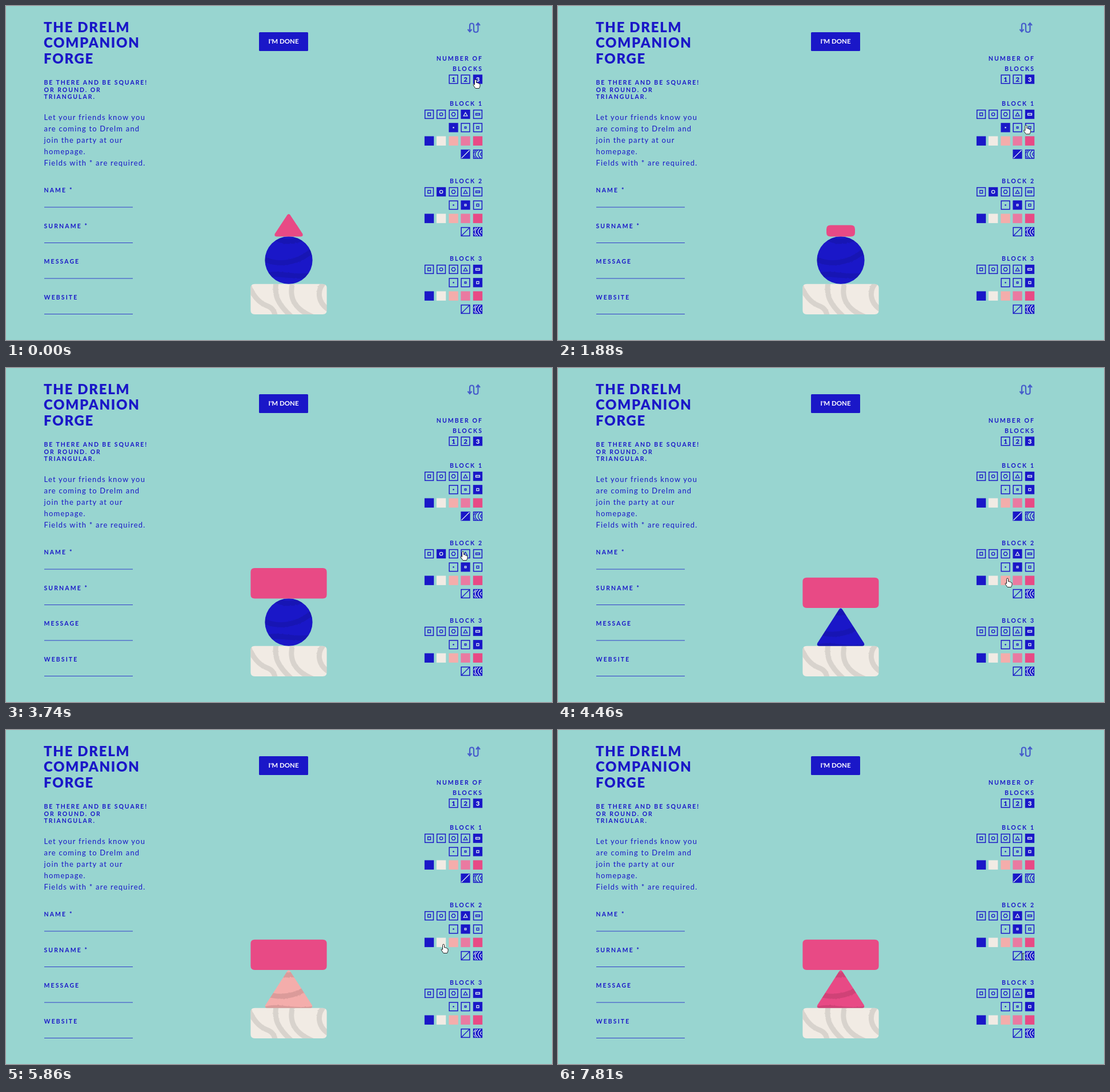
Write an HTML page that moves like this. It is 956x586 px and loops after 8 s.

```html
<!DOCTYPE html>
<html lang="en">
<head>
<meta charset="utf-8">
<title>Character builder</title>
<style>
  html, body { margin: 0; width: 100%; height: 100%; overflow: hidden; background: #98d5d0; }
  svg { display: block; width: 100vw; height: 100vh; }
  text { font-family: Lato, "Open Sans", sans-serif; fill: #1a17c8; white-space: pre; }
  .title { font-size: 24px; font-weight: 900; letter-spacing: 1.7px; }
  .lead { font-size: 10.5px; font-weight: 700; letter-spacing: 1.95px; }
  .body { font-size: 13px; letter-spacing: 1.2px; }
  .label { font-size: 10.5px; font-weight: 700; letter-spacing: 2.1px; }
  .right { text-anchor: end; }
  .button { font-size: 11.5px; font-weight: 700; text-anchor: middle; fill: #fff; }
  .digit { font-size: 11.5px; font-weight: 900; text-anchor: middle; }
</style>
</head>
<body>
<svg viewBox="0 0 956 586" preserveAspectRatio="none">
  <defs>
    <filter id="rough">
      <feTurbulence type="fractalNoise" baseFrequency=".25" numOctaves="2" seed="4"/>
      <feDisplacementMap in="SourceGraphic" scale="2.5"/>
    </filter>
  </defs>
  <g id="page"></g>
  <g id="options"></g>
  <g id="figure"></g>
  <path id="hand" fill="#fff" stroke="#222" stroke-linejoin="round"
    d="M-1.5 1.5Q-1.5 0 0 0T1.5 1.5V5.5Q3.5 5 4 6.3Q6 6 6.3 7.3Q8 7 8 9V11.5L6.5 15.5H0L-3.8 10Q-4.2 8.5 -2.6 8.4L-1.5 9.4Z"/>
  <path id="caret" fill="none" stroke="#333" d="M811.5 391.5Q814 391.5 814 393.5V402Q814 404 811.5 404M816.5 391.5Q814 391.5 814 393.5M814 402Q814 404 816.5 404"/>
</svg>
<script>
const LOOP = 8000;
const BLUE = '#1a17c8', LIGHT = '#d9ecee';
const COLORS = [BLUE, '#f1ebe4', '#f4adab', '#ea7aa1', '#e84a85'];
const [CIRCLE, TRIANGLE, RECT] = [1, 3, 4];
const WIDTHS = [50, 83.3, 133.3];
const RATIO = { [CIRCLE]: 1, [TRIANGLE]: .8, [RECT]: .4 };
const COLUMNS = [741, 762, 783.5, 804.5, 826];
const byId = id => document.getElementById(id);

const text = (cls, x, y, str) => `<text class="${cls}" x="${x}" y="${y}">${str}</text>`;
const lines = (cls, x, y, step, list) =>
  list.map((str, i) => text(cls, x, y + i * step, str)).join('');

function drawPage() {
  const fields = ['NAME *', 'SURNAME *', 'MESSAGE', 'WEBSITE'];
  const rules = fields.map((_, i) =>
    `<rect x="67" y="${352.5 + i * 62.5}" width="155" height="1" fill="${BLUE}" opacity=".8"/>`).join('');
  return lines('title', 66, 45.5, 27.5, ['THE DRELM', 'COMPANION', 'FORGE'])
    + lines('lead', 66.5, 138, 12.6, ['BE THERE AND BE SQUARE!', 'OR ROUND. OR', 'TRIANGULAR.'])
    + lines('body', 66.5, 199.5, 20, ['Let your friends know you', 'are coming to Drelm and',
      'join the party at our', 'homepage.', 'Fields with * are required.'])
    + lines('label', 66.5, 327, 62.5, fields) + rules
    + `<rect x="443" y="46" width="86" height="33" rx="1.5" fill="${BLUE}"/>`
    + text('button', 486, 66.3, 'I\'M DONE')
    + lines('label right', 835.1, 96, 17.5, ['NUMBER OF', 'BLOCKS'])
    + lines('label right', 835.1, 175, 136, ['BLOCK 1', 'BLOCK 2', 'BLOCK 3'])
    + `<path d="M812 44V34Q812 30.5 815.5 30.5T819 34V42.5Q819 46 822.7 46T826.5 42.5V31M808.5 41L812 45L815.5 41M823 34L826.5 30L830 34"
        fill="none" stroke="#465ccb" stroke-width="2.2"/>`;
}

// Each glyph is drawn around (0, 0) in the given ink colour.
const outline = d => ink => `<path d="${d}" fill="none" stroke="${ink}" stroke-width="1.3"/>`;
const box = (w, h = w) => outline(`M${-w / 2} ${-h / 2}h${w}v${h}h${-w}Z`);
const SHAPES = [
  box(5),
  outline('M-2.7 0A2.7 2.7 0 1 1 2.7 0A2.7 2.7 0 1 1 -2.7 0Z'),
  outline('M-3.4 0L-1.7 -3H1.7L3.4 0L1.7 3H-1.7Z'),
  outline('M0 -3L3.3 2.8H-3.3Z'),
  box(7, 3)
];
const SIZES = [box(1), box(2.8), box(4)];
const FILLS = [
  outline('M-7 7L7 -7'),
  outline('M7 -3Q2 0 7 3M5 -7Q-4 0 5 7M0 -7Q-9 0 0 7M-4 -7Q-5 -4 -7 -2M-7 3Q-5 4 -4 7')
];
const DIGITS = [1, 2, 3].map(n => ink => `<text class="digit" y="4" style="fill:${ink}">${n}</text>`);

function optionRow(glyphs, y, selected) {
  return glyphs.map((glyph, i) => {
    const on = i === selected, x = COLUMNS[5 - glyphs.length + i];
    return `<g transform="translate(${x} ${y})">
      <rect x="-7.4" y="-7.4" width="14.8" height="14.8" fill="${on ? BLUE : 'none'}" stroke="${BLUE}" stroke-width="1.5"/>
      ${glyph(on ? LIGHT : BLUE)}</g>`;
  }).join('');
}

const swatches = y => COLORS.map((color, i) =>
  `<rect x="${COLUMNS[i] - 8.2}" y="${y - 8.2}" width="16.4" height="16.4" fill="${color}"/>`).join('');

const drawOptions = blocks => optionRow(DIGITS, 128.5, 2) + blocks.map((b, i) => {
  const y = 190 + i * 136;
  return optionRow(SHAPES, y, b.shape) + optionRow(SIZES, y + 23.3, b.size)
    + swatches(y + 46.7) + optionRow(FILLS, y + 70, b.pattern);
}).join('');

const roundBox = (w, h, r) =>
  `M${r} 0H${w - r}Q${w} 0 ${w} ${r}V${h - r}Q${w} ${h} ${w - r} ${h}H${r}Q0 ${h} 0 ${h - r}V${r}Q0 0 ${r} 0Z`;
const OUTLINES = {
  [CIRCLE]: w => `M0 ${w / 2}A${w / 2} ${w / 2} 0 1 1 ${w} ${w / 2}A${w / 2} ${w / 2} 0 1 1 0 ${w / 2}Z`,
  [TRIANGLE]: (w, h) => `M${w / 2 - 2.5} 2Q${w / 2} -1 ${w / 2 + 2.5} 2L${w - .8} ${h - 5}Q${w + 1} ${h} ${w - 4} ${h}H4Q-1 ${h} .8 ${h - 5}Z`,
  [RECT]: (w, h) => roundBox(w, h, 7)
};
const ROUND_STRIPES = 'M-2 40C22 50 55 50 86 22M20 3C35 12 55 10 78 -2M-2 70C20 60 45 74 86 68';
const WIDE_STRIPES = 'M-4 2C6 24 16 34 28 38S42 50 44 60M45 -4C40 20 48 36 72 58M74 -4C66 24 76 44 110 58M130 -4C114 12 118 34 138 46';

function drawFigure(blocks) {
  let bottom = 541;
  return blocks.map((b, i) => [b, i]).reverse().map(([b, i]) => {
    const w = WIDTHS[b.size], h = w * RATIO[b.shape], d = OUTLINES[b.shape](w, h);
    bottom -= h;
    const stripes = b.shape === RECT ? WIDE_STRIPES : ROUND_STRIPES;
    return `<g transform="translate(${495 - w / 2} ${bottom})">
      <clipPath id="clip${i}"><path d="${d}"/></clipPath>
      <path d="${d}" fill="${COLORS[b.color]}"/>`
      + (b.pattern ? `<g clip-path="url(#clip${i})"><path d="${stripes}" fill="none" stroke="#000"
          stroke-opacity=".1" stroke-width="9" filter="url(#rough)"/></g>` : '') + '</g>';
  }).join('');
}

const START = [
  { shape: TRIANGLE, size: 0, color: 4, pattern: 0 },
  { shape: CIRCLE, size: 1, color: 0, pattern: 1 },
  { shape: RECT, size: 2, color: 1, pattern: 1 }
];
const CLICKS = [
  [1270, 0, { shape: RECT }],
  [2320, 0, { size: 2 }],
  [4080, 1, { shape: TRIANGLE }],
  [5280, 1, { color: 2 }],
  [6160, 1, { color: 1 }],
  [7170, 1, { color: 4 }]
];
// start, end, number of steps, destination
const MOVES = [
  [370, 1040, 8, 824, 189],
  [1570, 1710, 3, 809, 210],
  [1880, 2020, 3, 822, 209],
  [2850, 3020, 3, 791, 307],
  [3530, 3740, 4, 800, 322],
  [4250, 4880, 10, 785, 376],
  [5410, 5860, 7, 766, 376],
  [6460, 6940, 7, 823, 379],
  [7600, 7810, 4, 816, 393]
];

function pointerAt(t) {
  let x = 822, y = 129;
  for (const [from, to, steps, toX, toY] of MOVES) {
    if (t < from) break;
    const step = Math.min(steps, 1 + Math.floor((t - from) / (to - from) * (steps - 1) + 1e-6));
    const k = 1 - (1 - step / steps) ** 4;
    x += (toX - x) * k;
    y += (toY - y) * k;
  }
  return [x, y];
}

let shown = -1;
function render(t) {
  const done = CLICKS.filter(([at]) => t >= at);
  if (done.length !== shown) {
    shown = done.length;
    const blocks = START.map(b => ({ ...b }));
    for (const [, index, change] of done) Object.assign(blocks[index], change);
    byId('options').innerHTML = drawOptions(blocks);
    byId('figure').innerHTML = drawFigure(blocks);
  }
  const overText = t >= 7810;
  byId('hand').setAttribute('transform', `translate(${pointerAt(t)})`);
  byId('hand').setAttribute('visibility', overText ? 'hidden' : 'visible');
  byId('caret').setAttribute('visibility', overText ? 'visible' : 'hidden');
}

byId('page').innerHTML = drawPage();
render(0);
const began = performance.now();
(function tick() {
  render((performance.now() - began) % LOOP);
  requestAnimationFrame(tick);
})();
</script>
</body>
</html>
```
